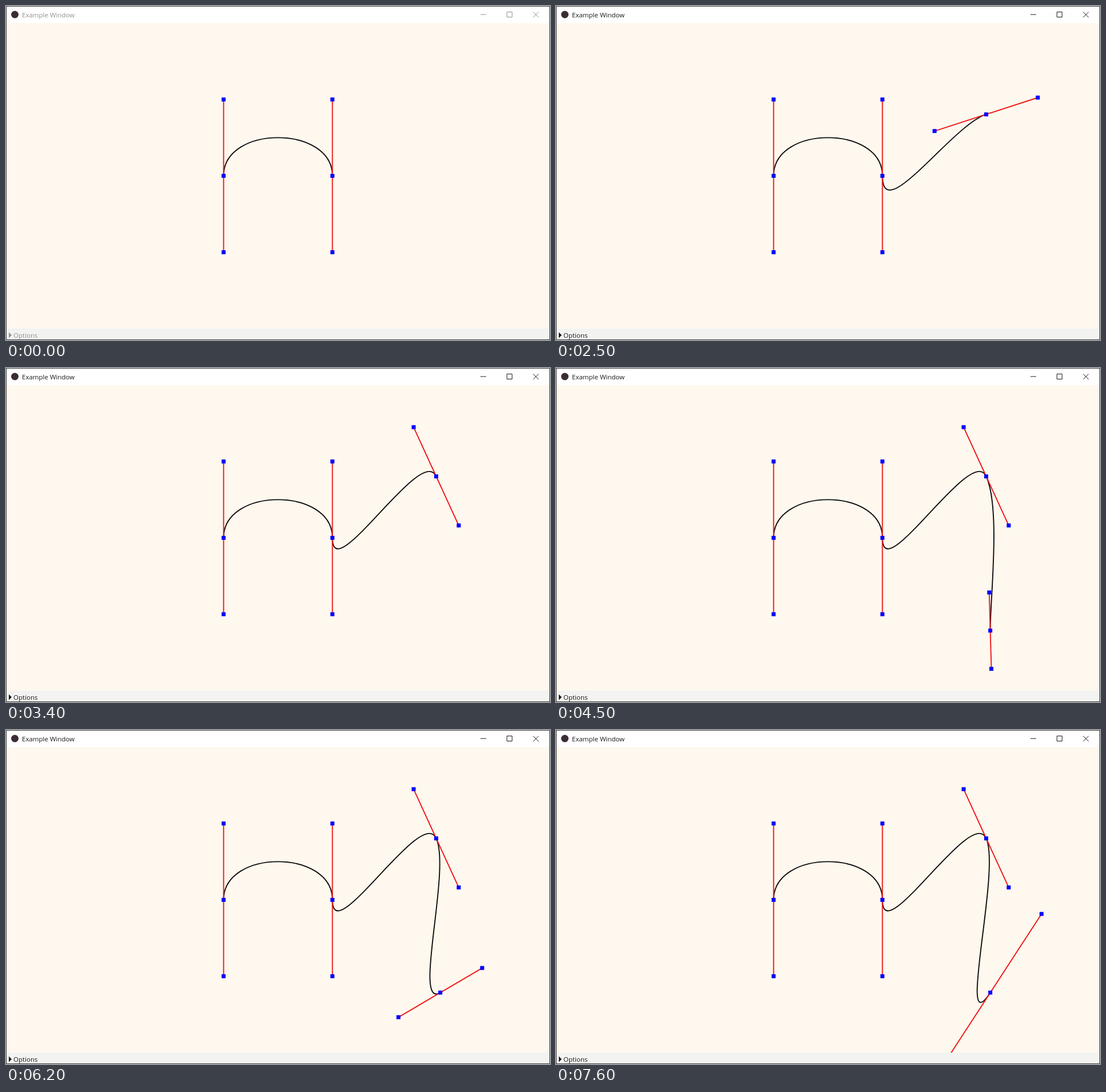
An HTML page for the animation above (8000 ms loop, 954 by 587 pixels).

```html
<!DOCTYPE html>
<html lang="en">
<head>
<meta charset="utf-8">
<title>Example Window</title>
<style>
  html, body { margin: 0; width: 100%; height: 100%; overflow: hidden; background: #fff; }
  svg { display: block; width: 100%; height: 100%; }
  text { font: 11.5px "Open Sans", "Noto Sans", sans-serif; }
</style>
</head>
<body>
<svg viewBox="0 0 954 587">
  <rect width="954" height="587" fill="#fff"/>
  <rect y="30" width="954" height="537" fill="#fff8ee"/>
  <path id="curve" fill="none" stroke="#0c0c0c" stroke-width="1.9"/>
  <path id="arms" fill="none" stroke="#ee1515" stroke-width="1.9"/>
  <path id="knobs" fill="#00f"/>
  <rect y="567" width="954" height="20" fill="#f3f3f1"/>
  <circle cx="15.5" cy="15" r="6.5" fill="#3b2c35"/>
  <g id="chrome">
    <text x="28" y="20">Example Window</text>
    <text x="13" y="583">Options</text>
    <path d="M5 573.5L10 578.5L5 583.5Z"/>
  </g>
  <path id="buttons" fill="none" d="M832 15H842M878.5 10.5H887.5V19.5H878.5ZM924.5 10.5L934 20M934 10.5L924.5 20"/>
  <rect x=".5" y=".5" width="953" height="586" fill="none" stroke="#3a3a3a"/>
</svg>
<script>
const LOOP = 8000, STEP = 100;
const el = id => document.getElementById(id);
const lerp = (a, b, u) => a + (b - a) * u;
const clamp = u => Math.max(0, Math.min(1, u));

// Position on the canvas as a fraction of its size.
const onCanvas = (u, v) => ({ x: 954 * u, y: 30 + 537 * v });

// Handles are polar (length, degrees); each drag is [start, end, length, degrees].
const nodes = [
  { ...onCanvas(.4, .5), from: 0, length: 134.25, angle: -90, drags: [] },
  { ...onCanvas(.6, .5), from: 0, length: 134.25, angle: 90, drags: [] },
  { x: 754.4, y: 190.4, from: 1500, length: 95.3, angle: -30.6, drags: [
    [2400, 2900, 94.6, 32.4],
    [2900, 3400, 94.9, 65.4]] },
  { x: 761.6, y: 461.6, from: 4400, length: 67.2, angle: 88.4, drags: [
    [5700, 6200, 85.2, -30.5],
    [6200, 6600, 104, -43.8],
    [6700, 6900, 106.4, -40.8],
    [6900, 7100, 115.6, -38.5],
    [7300, 7600, 165, -57]] }
];

function pose({ x, y, length, angle, drags }, t) {
  for (const [start, end, toLength, toAngle] of drags) {
    const u = clamp((t - start) / (end - start));
    length = lerp(length, toLength, u);
    angle = lerp(angle, toAngle, u);
  }
  const a = angle * Math.PI / 180;
  return { x, y, dx: length * Math.cos(a), dy: length * Math.sin(a) };
}

// Point at a signed share of the node's handle.
const along = (n, s) => [n.x + s * n.dx, n.y + s * n.dy];
const knob = ([x, y]) => `M${x - 3.5} ${y - 3.5}h7v7h-7Z`;

function draw(id, list, toPath) {
  el(id).setAttribute("d", list.map(toPath).join(""));
}

function render(time) {
  const t = Math.floor(time % LOOP / STEP) * STEP;
  const shown = nodes.filter(n => t >= n.from).map(n => pose(n, t));

  // The full handle is the Hermite tangent, so a Bezier arm is 2/3 of a half.
  draw("curve", shown, (n, i) => i
    ? `C${along(shown[i - 1], 2 / 3)} ${along(n, -2 / 3)} ${along(n, 0)}`
    : `M${along(n, 0)}`);
  draw("arms", shown, n => `M${along(n, -1)}L${along(n, 1)}`);
  draw("knobs", shown, n => [-1, 0, 1].map(s => knob(along(n, s))).join(""));

  // The window gains focus.
  const grey = Math.round(lerp(145, 25, clamp(t / 300)));
  const ink = `rgb(${grey},${grey},${grey})`;
  el("chrome").setAttribute("fill", ink);
  el("buttons").setAttribute("stroke", ink);
}

const start = performance.now();
function tick() {
  render(performance.now() - start);
  requestAnimationFrame(tick);
}
tick();
</script>
</body>
</html>
```
